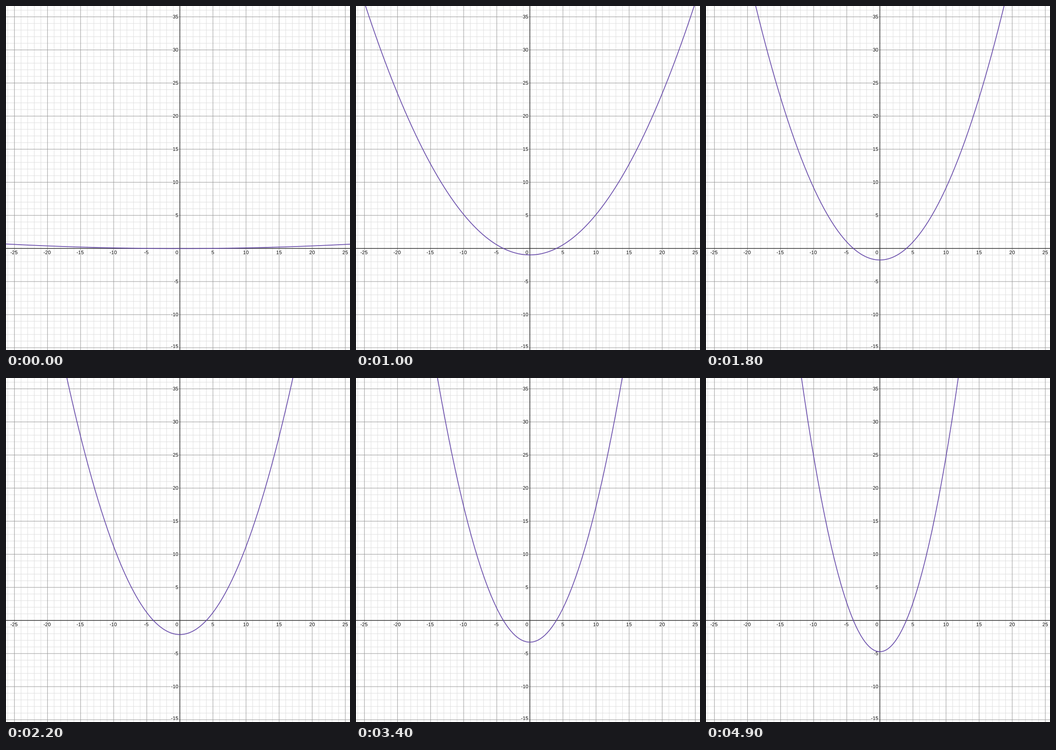
A matplotlib script for the animation above (5000 ms loop, 748x748 px).

```python
import matplotlib.pyplot as plt
import numpy as np
from matplotlib.animation import FuncAnimation
from matplotlib.patheffects import withStroke

SIZE, DPI = 748, 100
FRAMES, INTERVAL = 50, 100
UNIT = 14.39              # pixels per grid unit
X0, Y0 = 378.05, 527.2    # origin in pixels
PX = 72 / DPI             # one pixel in points

plt.rcParams["font.family"] = "Liberation Sans"

fig = plt.figure(figsize=(SIZE / DPI, SIZE / DPI), dpi=DPI, facecolor="white")
ax = fig.add_axes([0, 0, 1, 1])
ax.set_xlim(0, SIZE)
ax.set_ylim(SIZE, 0)
ax.axis("off")


def to_px(x, y):
    return X0 + UNIT * x, Y0 - UNIT * y


def grid_line(value, color, width, zorder):
    x, y = to_px(value, value)
    style = dict(color=color, lw=width * PX, zorder=zorder, snap=False)
    if 0 <= x <= SIZE:
        ax.axvline(x, **style)
    if 0 <= y <= SIZE:
        ax.axhline(y, **style)


def label(x, baseline, text, align):
    ax.text(x, baseline, text, size=11 * PX, ha=align, va="baseline",
            color="black", zorder=4,
            path_effects=[withStroke(linewidth=3 * PX, foreground="white")])


for n in range(-27, 38):
    if n == 0:
        grid_line(n, "#2a2a2a", 1.45, 3)
    elif n % 5 == 0:
        grid_line(n, "#989898", 1, 2)
    else:
        grid_line(n, "#dfdfdf", 1, 1)

for n in range(-25, 26, 5):
    if n:
        label(to_px(n, 0)[0] - (1 if n < 0 else 0.3), 539.5, str(n), "center")
label(374.7, 539.5, "0", "right")

for n in range(-15, 36, 5):
    if n:
        label(374.7, min(to_px(0, n)[1] + 3.4, 743.5), str(n), "right")

xs = np.linspace(-27, 27, 1081)
curve, = ax.plot([], [], color="#6042a6", alpha=0.9, lw=1.8 * PX, zorder=5)


def update(frame):
    a = 0.001 + 0.006 * frame
    curve.set_data(*to_px(xs, a * (xs ** 2 - 16)))
    return curve,


anim = FuncAnimation(fig, update, frames=FRAMES, interval=INTERVAL,
                     repeat=True, repeat_delay=0)
plt.show()
```
